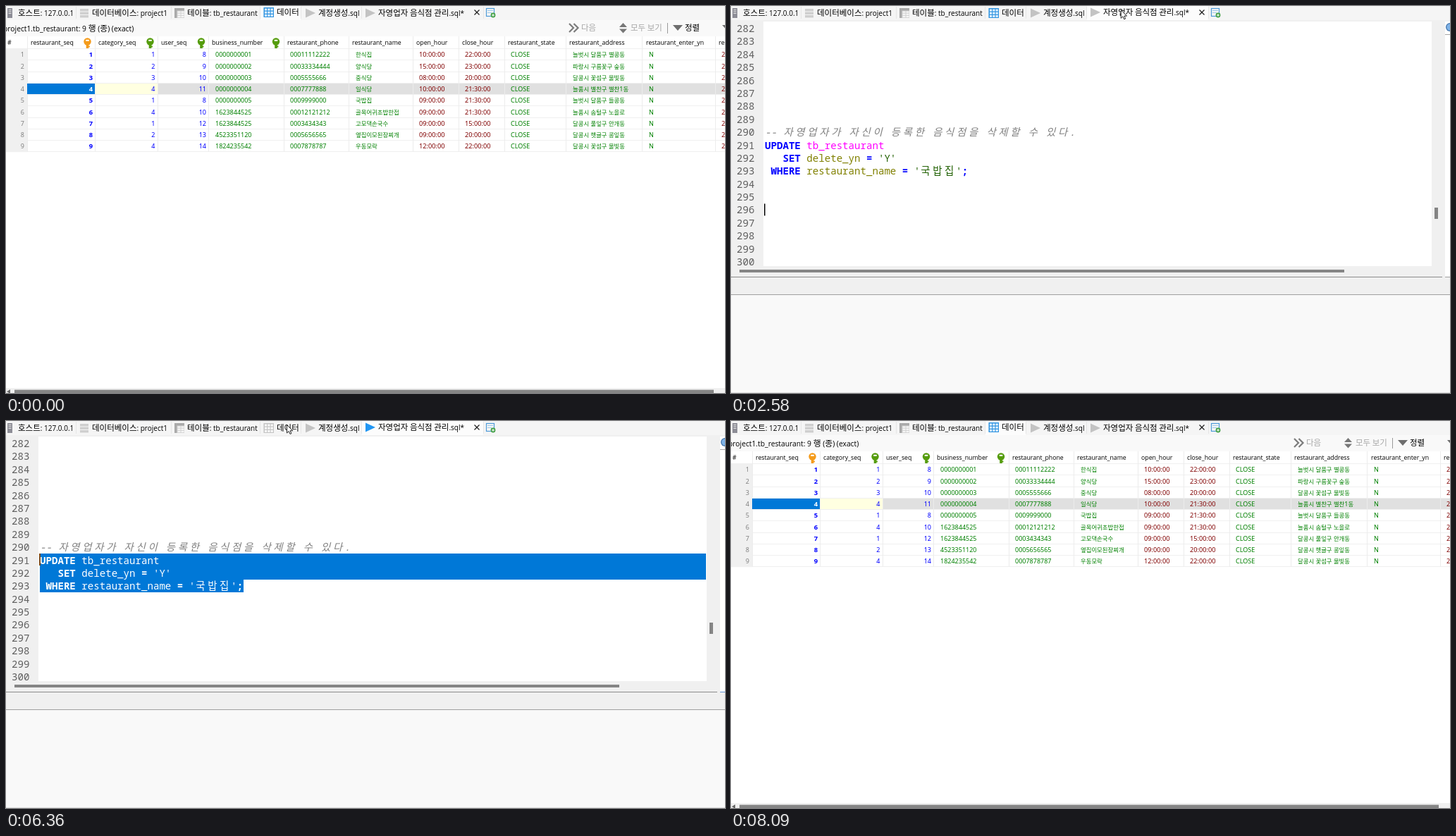
Animation of 1020 by 549 pixels, one loop 8200 ms. Source, as an HTML page with a canvas:

```html
<!DOCTYPE html>
<html lang="ko">
<head>
<meta charset="utf-8">
<title>SQL 편집기</title>
<style>
html, body { margin: 0; width: 100%; height: 100%; overflow: hidden; background: #fff; }
canvas { display: block; width: 1020px; height: 549px; }
</style>
</head>
<body>
<canvas id="stage" width="1020" height="549"></canvas>
<script>
const ctx = document.getElementById('stage').getContext('2d');
const LOOP = 8200;
const CJK = '"Noto Sans CJK KR","Noto Sans CJK JP","Noto Sans KR",sans-serif';
const UI = '"Open Sans","Noto Sans",sans-serif';
const CELL = '"Noto Sans","Open Sans",sans-serif';
const MONO = '"Noto Sans Mono","DejaVu Sans Mono",monospace';
const BLUE = '#0000ff', GREEN = '#008000', MAROON = '#800000', PICK = '#0078d7';

function rect(x, y, w, h, color) {
  ctx.fillStyle = color;
  ctx.fillRect(x, y, w, h);
}

function poly(points, fill, stroke, width = 1) {
  ctx.beginPath();
  points.forEach(([x, y], i) => i ? ctx.lineTo(x, y) : ctx.moveTo(x, y));
  ctx.closePath();
  if (fill) { ctx.fillStyle = fill; ctx.fill(); }
  if (stroke) { ctx.strokeStyle = stroke; ctx.lineWidth = width; ctx.stroke(); }
}

function line(points, color, width = 1) {
  ctx.beginPath();
  points.forEach(([x, y], i) => i ? ctx.lineTo(x, y) : ctx.moveTo(x, y));
  ctx.strokeStyle = color;
  ctx.lineWidth = width;
  ctx.stroke();
}

function disc(x, y, r, color) {
  ctx.beginPath();
  ctx.arc(x, y, r, 0, Math.PI * 2);
  ctx.fillStyle = color;
  ctx.fill();
}

// Hangul and Latin runs use separate fonts and sizes
function text(s, x, y, { size = 10, ko = size * 1.15, font = UI, color = '#000', weight = 400, right = false } = {}) {
  const runs = s.match(/[가-힣]+|[^가-힣]+/g).map(run => {
    const f = /[가-힣]/.test(run) ? `${weight} ${ko}px ${CJK}` : `${weight} ${size}px ${font}`;
    ctx.font = f;
    return [run, f, ctx.measureText(run).width];
  });
  if (right) x -= runs.reduce((sum, r) => sum + r[2], 0);
  ctx.fillStyle = color;
  for (const [run, f, w] of runs) {
    ctx.font = f;
    ctx.fillText(run, x, y);
    x += w;
  }
}

/* ---- tab bar ---- */

function play(x, y, color) {
  poly([[x, y - 6.5], [x + 14, y], [x, y + 6.5]], color);
}

function gridIcon(y, on) {
  const c = on ? '#2f93e0' : '#c4c4c4';
  rect(365.5, y - 7, 14.5, 14, c);
  for (let i = 0; i < 9; i++)
    rect(367 + i % 3 * 4.3, y - 5.5 + (i / 3 | 0) * 4.2, 3.2, 3, on ? '#e4f3ff' : '#fafafa');
}

function tabs(editor, blue) {
  rect(0, 0, 1020, 20, '#f5f5f5');
  if (editor) rect(505, 0, 172, 20, '#fcfcfc');
  else rect(361, 0, 57, 20, '#fcfcfc');
  for (const x of [99, 234, 360, 418, 504, 677]) rect(x, 1, 1, 17, '#e6e6e6');

  rect(2, 3, 7, 14, '#8d8d96');
  for (let i = 0; i < 3; i++) rect(3.5, 5 + i * 2.5, 4, 1, '#e5e5e5');
  for (let i = 0; i < 3; i++) rect(105, 4 + i * 4.5, 12, 3.5, '#cfcfcf');
  rect(239, 3, 14, 14, '#d2d2d2');
  rect(239, 3, 14, 3.5, '#aaa');
  rect(239, 3, 3.5, 14, '#aaa');
  for (let i = 0; i < 6; i++) rect(243.5 + i % 2 * 5, 7.5 + (i >> 1) * 3.2, 4, 2.2, '#f6f6f6');
  gridIcon(editor ? 10 : 9, blue === 'data');
  play(425, 10, '#c3c3c3');
  play(510, editor ? 9 : 10, blue === 'script' ? '#2196f3' : '#c3c3c3');

  text('호스트: 127.0.0.1', 17, 14);
  text('데이터베이스: project1', 122, 14);
  text('테이블: tb_restaurant', 257, 14);
  text('데이터', 384, editor ? 14 : 13);
  text('계정생성.sql', 443, 14);
  text('자영업자 음식점 관리.sql*', 528, editor ? 13 : 14);

  line([[664.5, 5.5], [671.5, 12.5]], '#222', 1.3);
  line([[671.5, 5.5], [664.5, 12.5]], '#222', 1.3);
  ctx.strokeStyle = '#4d9ad8';
  ctx.lineWidth = 1.2;
  ctx.strokeRect(681.5, 3.5, 11, 11);
  rect(683, 6, 8, 1, '#9cc8ea');
  rect(683, 9, 6, 1, '#9cc8ea');
  disc(691, 13, 3.4, '#43a047');
  rect(689, 12.5, 4, 1, '#fff');
  rect(690.5, 11, 1, 4, '#fff');
}

/* ---- data grid ---- */

const heads = [[2, '#'], [35, 'restaurant_seq'], [131, 'category_seq'], [220, 'user_seq'],
  [292, 'business_number'], [399, 'restaurant_phone'], [491, 'restaurant_name'], [582, 'open_hour'],
  [647, 'close_hour'], [712, 'restaurant_state'], [799, 'restaurant_address'],
  [908, 'restaurant_enter_yn'], [1011, 're']];
const edges = [30, 126, 215, 287, 394, 486, 577, 642, 707, 794, 902, 1006];
const rows = [
  '1|8|0000000001|00011112222|한식집|10|22:00|늘벗시 달품구 별콩동',
  '2|9|0000000002|00033334444|양식당|15|23:00|파랑시 구름꽃구 숲동',
  '3|10|0000000003|0005555666|중식당|08|20:00|달콩시 꽃섬구 물빛동',
  '4|11|0000000004|0007777888|일식당|10|21:30|늘품시 별찬구 별찬1동',
  '1|8|0000000005|0009999000|국밥집|09|21:30|늘벗시 달품구 들콩동',
  '4|10|1623844525|00012121212|골목어귀초밥한접|09|21:30|늘품시 솜털구 노을로',
  '1|12|1623844525|0003434343|고모댁손국수|09|15:00|달콩시 풀잎구 안개동',
  '2|13|4523351120|0005656565|옆집이모된장찌개|09|20:00|달콩시 햇귤구 콩잎동',
  '4|14|1824235542|0007878787|우동모락|12|22:00|달콩시 꽃섬구 물빛동'
].map(r => r.split('|'));

function key(x, color) {
  disc(x, 50.5, 5.2, color);
  rect(x - 1.8, 53, 3.6, 7, color);
  rect(x, 56.5, 3.4, 2, color);
  rect(x - 2.3, 47.8, 4.6, 2, '#fff');
}

function toolbar() {
  rect(0, 20, 1020, 23, '#f9f9f9');
  text('project1.tb_restaurant: 9 행 (종) (exact)', -4, 36, { size: 10.3 });
  for (const x of [799, 805.5]) line([[x, 25], [x + 6, 31], [x, 37]], '#7c7c7c', 2.2);
  text('다음', 816, 35, { color: '#a6a6a6' });
  poly([[870, 30], [875.5, 24], [881, 30]], '#777');
  poly([[870, 32.5], [875.5, 38.5], [881, 32.5]], '#777');
  text('모두 보기', 886, 35, { color: '#a6a6a6' });
  rect(938, 24, 1, 15, '#9a9a9a');
  poly([[946, 27], [960, 27], [953, 35]], '#6e6e6e');
  text('정렬', 963, 35);
  poly([[1016, 27], [1030, 27], [1023, 35]], '#6e6e6e');
}

function grid(wide) {
  rect(0, 43, 1020, 506, '#fff');
  toolbar();
  const top = 61, pitch = 16.25;
  rect(0, top, 30, pitch * 9, '#f0f0f0');
  rect(30, top + pitch * 3, 990, pitch, '#e0e0e0');
  rect(126, top + pitch * 3, 89, pitch, '#ffffe1');
  for (let i = 0; i <= 9; i++) rect(0, Math.round(top + pitch * i) - 1, 1020, 1, '#f0f0f0');
  for (const x of edges) rect(x, 43, 1, 164, '#ececec');
  rect(30, 110, 96, 15, PICK);

  for (const [x, s] of heads) text(s, x, 55, { size: 8.75 });
  key(115.5, '#f49b1b');
  for (const x of [204.5, 277, 383]) key(x, '#559c0d');

  rows.forEach(([cat, user, biz, phone, name, open, close, place], i) => {
    const y = top + pitch * (i + .5) + 3.2;
    const put = (s, x, color, more) => text(s, x, y, { size: 9, ko: 8.4, font: CELL, color, ...more });
    const end = { right: true };
    put(String(i + 1), 26, '#808080', end);
    put(String(i + 1), 123, i === 3 ? '#fff' : BLUE, { right: true, weight: 700, size: 9.4 });
    put(cat, 211.5, BLUE, end);
    put(user, 284, BLUE, end);
    put(biz, 297, GREEN);
    put(phone, 403, GREEN);
    put(name, 496, GREEN);
    put(open + ':00:00', 586, MAROON, { size: 9.2 });
    put(close + ':00', 651, MAROON, { size: 9.2 });
    put('CLOSE', 716, GREEN);
    put(place, 804, GREEN);
    put('N', 912, GREEN);
    put('2', 1015, MAROON);
  });

  rect(0, 542, 1020, 7, '#f0f0f0');
  if (wide) {
    rect(12, 544.5, 992, 4.5, '#858585');
    poly([[1, 547], [6, 544], [6, 550]], '#666');
  } else rect(12, 546, 992, 2, '#858585');
}

/* ---- code editor ---- */

const X0 = 48, ADV = 8.47, PITCH = 18.39;
const lineY = n => 32 + (n - 282) * PITCH;
const code = {
  290: [['-- 자영업자가 자신이 등록한 음식점을 삭제할 수 있다.', '#808080', 'italic 400']],
  291: [['UPDATE', BLUE, 700], [' tb_restaurant', '#ff00ff', 400]],
  292: [['   SET', BLUE, 700], [' delete_yn', '#808000', 400], [' = ', BLUE, 700], ["'Y'", '#206000', 400]],
  293: [[' WHERE', BLUE, 700], [' restaurant_name', '#808000', 400], [' = ', BLUE, 700],
    ["'국밥집'", '#206000', 400], [';', BLUE, 700]]
};

// Every character sits on a fixed column; Hangul takes two
function codeLine(n, white) {
  let x = X0;
  for (const [s, color, style] of code[n]) {
    ctx.fillStyle = white ? '#fff' : color;
    for (const ch of s) {
      const ko = /[가-힣]/.test(ch);
      ctx.font = `${style} ${ko ? 14.4 : 14.1}px ${ko ? CJK : MONO}`;
      ctx.fillText(ch, x + (ko ? 1 : 0), lineY(n) + 5);
      x += ko ? ADV * 2 : ADV;
    }
  }
}

function selection(head) {
  for (let n = head.n; n <= 293; n++) {
    const x = n === head.n ? head.x : X0;
    const end = n === 293 ? 337 : 993;
    if (end <= x) continue;
    const y = lineY(n) - 9.2;
    ctx.save();
    ctx.beginPath();
    ctx.rect(x, Math.round(y), end - x, Math.round(y + PITCH) - Math.round(y));
    ctx.clip();
    ctx.fillStyle = PICK;
    ctx.fillRect(0, y - 2, 1020, PITCH + 4);
    codeLine(n, true);
    ctx.restore();
  }
}

function dragHead(t) {
  const m = mouse(Math.max(3390, t - 94));
  const n = m.y > 225 ? 293 : m.y > 207 ? 292 : 291;
  const x = n === 291 ? X0 : X0 + Math.round((m.x - X0) / ADV) * ADV;
  return { n, x: Math.max(X0, x) };
}

function editor(t) {
  rect(0, 20, 1020, 529, '#f0f0f0');
  rect(46, 22, 948, 347, '#fff');
  ctx.save();
  ctx.beginPath();
  ctx.rect(0, 20, 994, 349);
  ctx.clip();
  for (let n = 282; n <= 300; n++) text(String(n), 8, lineY(n) + 5, { size: 14.1, font: MONO, color: '#606060' });
  for (const n in code) codeLine(+n);
  if (t >= 3390) selection(dragHead(t));
  ctx.restore();

  const picked = t >= 3390;
  const blink = picked ? Math.floor((t - 3950) / 530) % 2 === 0 : t < 3040;
  if (t >= 3950 && blink) rect(47, 188, 2, 17, '#7a4a1c');
  else if (!picked && blink) rect(47, lineY(296) - 9, 1.5, 17, '#000');

  rect(998, 286, 5, 16, '#858585');
  rect(12, 374, 858, 4, '#858585');
  rect(0, 384, 1009, 1, '#8c8c8c');
  rect(1013, 22, 7, 363, '#fff');
  rect(1013, 40, 7, 1, '#a5a5a5');
  rect(1013, 384, 7, 1, picked ? '#5d8fd0' : '#a0a0a0');
  disc(1020, 30, 6, '#3d6fa8');
  disc(1020, 30, 4.8, '#7eb2e6');
  rect(0, 409, 1020, 140, '#a0a0a0');
  rect(0, 410, 1020, 138, '#f9f9f9');
  rect(0, 548, 1020, 1, '#e0e0e0');
}

/* ---- mouse ---- */

const path = [
  [190, 985, 492], [500, 991, 330], [800, 884, 104], [1010, 925, 146], [1080, 915, 140],
  [1420, 551, 45], [1560, 553, 38], [1830, 553, 5], [2580, 553, 5], [3320, 337, 234],
  [3390, 337, 234], [3660, 62, 206], [3800, 25, 203], [5640, 25, 203], [5750, 311, 114],
  [6060, 311, 114], [6360, 398, 5], [6860, 398, 5], [7090, 625, 234], [7690, 958, 552]
];

function mouse(t) {
  let i = 1;
  while (i < path.length - 1 && t > path[i][0]) i++;
  const [t0, x0, y0] = path[i - 1], [t1, x1, y1] = path[i];
  const k = Math.min(1, Math.max(0, (t - t0) / (t1 - t0)));
  return { x: x0 + (x1 - x0) * k, y: y0 + (y1 - y0) * k };
}

function pointer(t, inEditor) {
  if (t < 190 || t >= 7690) return;
  const { x, y } = mouse(t);
  if (t >= 3390 && t < 4260) {
    ctx.globalAlpha = .75 * Math.min(1, (4260 - t) / 190);
    disc(x, y, 10.5, '#f7ea30');
    ctx.globalAlpha = 1;
  }
  if (inEditor && y > 21) {
    const beam = [[x - 3, y - 7], [x, y - 6], [x, y + 6], [x - 3, y + 7]];
    line(beam, '#444', 1.2);
    line(beam.map(([a, b]) => [2 * x - a, b]), '#444', 1.2);
  } else {
    const shape = [[0, 0], [0, 11.5], [2.7, 9], [4.5, 13], [6.4, 12.2], [4.7, 8.3], [8.3, 8.3]];
    poly(shape.map(([a, b]) => [x + a + .5, y + b + .5]), '#fff', '#222');
  }
}

function frame() {
  const t = performance.now() % LOOP;
  const inEditor = t >= 2510 && t < 6430;
  if (inEditor) editor(t);
  else grid(t < 600 || t >= 7760);
  tabs(inEditor, t >= 2650 && t < 6500 ? 'script' : 'data');
  pointer(t, inEditor);
  requestAnimationFrame(frame);
}
frame();
</script>
</body>
</html>
```
